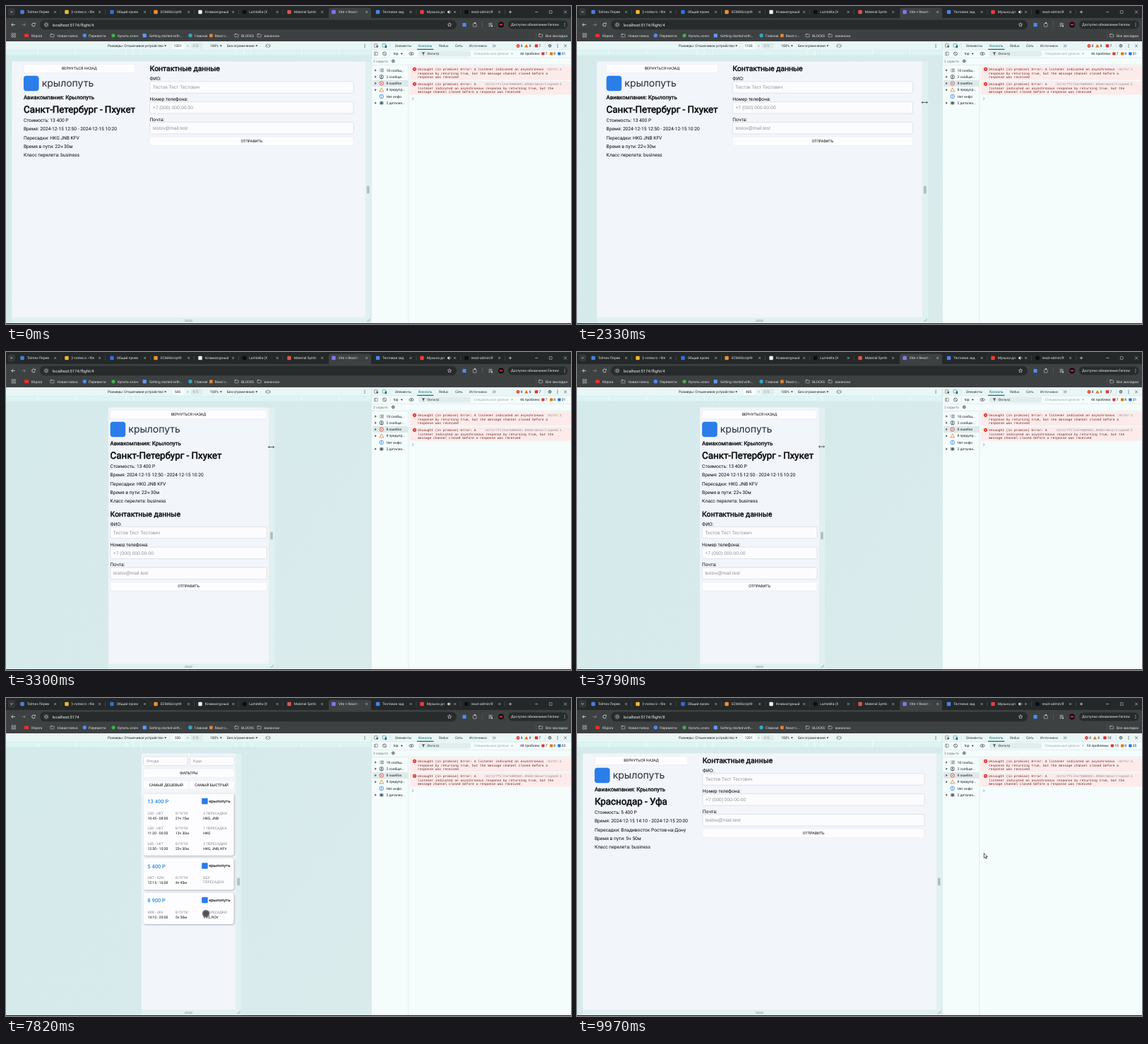
An HTML page with a canvas that plays this animation: 800x450 px, repeating every 10 s.

```html
<!DOCTYPE html>
<html lang="ru">
<head>
<meta charset="utf-8">
<title>Flight page</title>
<style>
html, body { margin: 0; width: 100%; height: 100%; overflow: hidden; background: #000; }
canvas { display: block; width: 800px; height: 450px; }
</style>
</head>
<body>
<canvas id="stage"></canvas>
<script>
const LOOP = 10000, CSS = 1 / 2.4, MID = 258.5;
const TO_LIST = 5480, TO_SECOND = 8200;
const UI = 'Roboto, "Noto Sans", sans-serif';
const ARIAL = '"Liberation Sans", Arial, sans-serif';
const MONO = '"Liberation Mono", monospace';
const LOGO = 'Inter, Roboto, sans-serif';
const INK = '#1f2326', BLACK = '#08090b', LIGHT = '#e3e3e3', BRAND = '#2b7de9';
const STRIP = '#242829', BAR = '#3d4142', WELL = '#272b2b';

const canvas = document.getElementById('stage');
const c = canvas.getContext('2d');
const dpr = window.devicePixelRatio || 1;
canvas.width = 800 * dpr;
canvas.height = 450 * dpr;

// ---------- drawing helpers ----------
function setFont(size, font = UI, weight = 400) {
  c.font = `${weight} ${size}px ${font}`;
}
// y is the middle of the capital letters
function text(s, x, y, o = {}) {
  const { size = 4.88, color = INK, font = UI, weight = 400, align = 'left', heavy = false } = o;
  setFont(size, font, weight);
  c.fillStyle = color;
  c.textAlign = align;
  c.fillText(s, x, y + size * 0.355);
  if (heavy) {
    c.strokeStyle = color;
    c.lineWidth = size / 24;
    c.strokeText(s, x, y + size * 0.355);
  }
}
function box(x, y, w, h, fill, r = 0, stroke) {
  c.beginPath();
  c.roundRect(x, y, w, h, r);
  if (fill) { c.fillStyle = fill; c.fill(); }
  if (stroke) { c.strokeStyle = stroke; c.lineWidth = 0.5; c.stroke(); }
}
function dot(x, y, r, color) {
  c.beginPath();
  c.arc(x, y, r, 0, 7);
  c.fillStyle = color;
  c.fill();
}
function ring(x, y, r, color, w = 0.7, from = 0, to = 6.3) {
  c.beginPath();
  c.arc(x, y, r, from, to);
  c.strokeStyle = color;
  c.lineWidth = w;
  c.stroke();
}
function line(color, w, ...p) {
  c.beginPath();
  for (let i = 0; i < p.length; i += 2) c.lineTo(p[i], p[i + 1]);
  c.strokeStyle = color;
  c.lineWidth = w;
  c.stroke();
}
function poly(color, ...p) {
  c.beginPath();
  for (let i = 0; i < p.length; i += 2) c.lineTo(p[i], p[i + 1]);
  c.closePath();
  c.fillStyle = color;
  c.fill();
}
const cross = (x, y, r, color, w = 0.6) => {
  line(color, w, x - r, y - r, x + r, y + r);
  line(color, w, x - r, y + r, x + r, y - r);
};
const down = (x, y, color = INK) => poly(color, x - 1.5, y - 0.9, x + 1.5, y - 0.9, x, y + 1.1);
const right = (x, y) => poly('#4a5055', x - 1, y - 1.7, x + 1.4, y, x - 1, y + 1.7);
const warn = (x, y) => poly('#e8710a', x, y - 2.4, x + 2.6, y + 2.2, x - 2.6, y + 2.2);
const kebab = (x, y, color) => [-2, 0, 2].forEach(d => dot(x, y + d, 0.55, color));
function gear(x, y, color = '#40484c') {
  ring(x, y, 1.9, color, 0.9);
  dot(x, y, 0.8, color);
}
function folder(x, y) {
  box(x - 2.6, y - 1.6, 5.2, 3.8, null, 0.6, LIGHT);
  line(LIGHT, 0.7, x - 2.4, y - 2, x - 0.4, y - 2);
}

// ---------- timing ----------
function at(keys, t, col = 1, ease = false) {
  if (t <= keys[0][0]) return keys[0][col];
  for (let i = 1; i < keys.length; i++) {
    const a = keys[i - 1], b = keys[i];
    if (t <= b[0]) {
      let k = (t - a[0]) / (b[0] - a[0]);
      if (ease) k = k * k * (3 - 2 * k);
      return a[col] + (b[col] - a[col]) * k;
    }
  }
  return keys[keys.length - 1][col];
}
const WIDTH = [[2180, 1201], [2520, 985], [2820, 781], [3300, 545], [3790, 405], [4350, 320],
  [8620, 320], [8950, 790], [9350, 1201]];
const PAD = [[320, 10], [405, 7], [781, 5], [1201, 40]];
const COME = [[1700, 560, 456], [2150, 512.7, 137]];
const ROAM = [[4450, 329, 134], [4750, 330, 105], [5270, 288, 75.5], [5430, 262, 90], [6330, 262, 90],
  [6800, 264, 101], [7150, 264, 101], [7800, 283, 305], [8250, 283, 305], [8600, 329, 262]];
const LEAVE = [[9350, 512.7, 240], [9900, 576.3, 219.6]];

// ---------- browser frame ----------
const TABS = [
  [23, 'Tolmex Перев', '#4a7fe0'], [86, '[~notes/s ~file', '#f2b92d'], [150, 'Общий проек', '#2f6fe0'],
  [212, 'ECMAScript®', '#f0902c'], [275, 'Клавиатурный', '#f0f0f0'], [337.5, 'Lumirella (X', '#0e0e0e'],
  [401, 'Material Symb', '#e0574a'], [464, 'Vite + React -', '#8d72f2'], [526.5, 'Тестовое зад', '#4285f4'],
  [589, 'Музыка дл', '#f23a3a'], [652, 'react-admin/R', '#0e0e0e']
];
function browser(url) {
  box(0, 0, 800, 17, STRIP);
  box(0, 17, 800, 33, BAR);
  box(3, 3, 10, 10.5, '#333738', 3);
  line(LIGHT, 0.8, 6.3, 7.5, 8, 9.2, 9.7, 7.5);
  box(457, 2.5, 60, 16, BAR, 3.5);
  TABS.forEach(([x, title, color], i) => {
    box(x - 2.7, 5.8, 5.4, 5.4, color, 1);
    text(title, x + 6.7, 8.6, { color: LIGHT });
    cross(x + 46.6, 8.5, 1.5, '#d0d0d0');
    if (i !== 6 && i !== 7) line('#555', 0.5, x + 54.5, 5, x + 54.5, 12);
  });
  poly(LIGHT, 625, 7.6, 626.3, 7.6, 628, 6, 628, 11, 626.3, 9.6, 625, 9.6);
  ring(628, 8.5, 1.8, LIGHT, 0.6, -1, 1);
  line(LIGHT, 0.7, 711.8, 8.5, 716.2, 8.5);
  line(LIGHT, 0.7, 714, 6.3, 714, 10.7);
  line(LIGHT, 0.6, 749.2, 8.5, 753.2, 8.5);
  box(769.3, 6.6, 3.8, 3.8, null, 0.5, LIGHT);
  cross(792, 8.5, 2, LIGHT);

  line(LIGHT, 0.8, 12.8, 26.5, 7.8, 26.5);
  line(LIGHT, 0.8, 10, 24.2, 7.7, 26.5, 10, 28.8);
  line('#878787', 0.8, 22.5, 26.5, 27.5, 26.5);
  line('#878787', 0.8, 25.3, 24.2, 27.6, 26.5, 25.3, 28.8);
  ring(39, 26.5, 2.3, LIGHT, 0.8, 0.2, 5.4);
  poly(LIGHT, 39.8, 25.6, 41.7, 23.6, 41.7, 25.8);
  box(48, 19.7, 590, 13.6, WELL, 6.8);
  dot(57, 26.5, 4.3, BAR);
  ring(57, 26.5, 1.9, LIGHT, 0.6);
  text(url, 65.7, 26.6, { size: 5.75, color: '#f0f0f0' });
  c.beginPath();
  for (let i = 0; i < 10; i++) {
    const a = i * Math.PI / 5 - Math.PI / 2, r = i % 2 ? 1.3 : 2.9;
    c.lineTo(628 + r * Math.cos(a), 26.5 + r * Math.sin(a));
  }
  c.closePath();
  c.strokeStyle = LIGHT;
  c.lineWidth = 0.6;
  c.stroke();
  box(646.4, 24, 5.2, 5.2, '#4d8df5', 0.8);
  box(661.3, 24.6, 4.8, 4.6, null, 0.6, LIGHT);
  dot(664, 24.1, 1, LIGHT);
  line('#646464', 0.5, 674.5, 22, 674.5, 31);
  [24.6, 26.6, 28.6].forEach((y, i) => line(LIGHT, 0.7, 683.5, y, i < 2 ? 688.5 : 686, y));
  dot(688, 28.5, 1.1, LIGHT);
  dot(701, 26.5, 4, '#0e0e0e');
  box(698.6, 25.2, 4.8, 2.4, '#d62839', 0.6);
  box(711, 20.4, 84.5, 12.2, WELL, 6);
  text('Доступно обновление Fenrow', 715, 26.5, { color: '#f0f0f0' });
  kebab(791, 26.5, LIGHT);

  [9, 12.4].forEach(x => [39.7, 43].forEach(y => box(x - 1, y - 1, 2.2, 2.2, null, 0.2, LIGHT)));
  box(26, 39.5, 6, 4.6, '#ff2b2b', 1.2);
  dot(111.3, 41.8, 2.7, '#4d8df5');
  dot(152, 41.8, 2.6, '#43b04a');
  box(193.6, 39.2, 5.2, 5.2, '#5f9cf2', 0.8);
  dot(261, 41.8, 2.7, '#35a7c4');
  box(288, 39.4, 4.6, 4.8, '#e0873a', 0.8);
  [65.5, 326.5, 358.5, 757].forEach(x => folder(x, 41.6));
  [[36, 'Klipora'], [72.5, 'Новая папка'], [117, 'Перевести'], [158, 'Купить ключ'],
    [203, 'Getting started with...'], [267, 'Главная'], [295.5, 'React с...'], [333, 'BLOCKS'],
    [365.5, 'вакански'], [764, 'Все закладки']].forEach(([x, s]) => text(s, x, 41.8, { color: LIGHT }));
  line('#5a5e5f', 0.5, 750.5, 38, 750.5, 46);
}

// ---------- inspector panel ----------
function inspector(v) {
  box(517, 50, 283, 400, '#f4fcfc');
  box(517, 50, 283, 12, '#e9f6f6');
  line('#c3d5d6', 0.5, 517.3, 50, 517.3, 449);
  [62, 73.3].forEach(y => line('#cfdfe0', 0.5, 517, y, 800, y));
  box(521.5, 53.7, 4.6, 4.6, null, 0.5, '#40484c');
  poly('#40484c', 523.7, 55.6, 527.4, 57, 525.5, 59);
  box(533, 53.7, 5, 4.4, null, 0.5, '#00757c');
  box(536.6, 55.6, 2.4, 3.6, '#00757c', 0.4);
  line('#c3d5d6', 0.5, 544, 52.5, 544, 60);
  [[550.5, 'Элементы'], [584, 'Консоль'], [613, 'Redux'], [636, 'Сеть'], [656, 'Источники']]
    .forEach(([x, s]) => text(s, x, 56.5, { color: x === 584 ? '#00696f' : '#30383b' }));
  box(582, 60.8, 23.5, 1.2, '#00757c', 0.5);
  [689, 691.4].forEach(x => line('#40484c', 0.7, x, 54.6, x + 1.9, 56.4, x, 58.2));
  const sh = v.bad > 9 ? -3.5 : 0;
  dot(725 + sh, 56.5, 2.4, '#dc362e');
  cross(725 + sh, 56.5, 0.9, '#fff');
  text('8', 728.7 + sh, 56.5);
  warn(736.8 + sh, 56.4);
  text('8', 740.7 + sh, 56.5);
  box(748.7 + sh, 54.2, 4.5, 4.2, '#dc362e', 0.8);
  text(v.bad, 754.6 + sh, 56.5);
  line('#c3d5d6', 0.5, 763.5, 52.5, 763.5, 60);
  gear(770, 56.3);
  kebab(781, 56.4, '#40484c');
  cross(792, 56.4, 1.8, '#40484c', 0.7);

  box(521.5, 65.2, 4.8, 4.6, null, 0.5, '#40484c');
  line('#40484c', 0.6, 523.2, 65.2, 523.2, 69.8);
  ring(536, 67.5, 2.5, '#40484c');
  line('#40484c', 0.7, 534.3, 65.8, 537.7, 69.2);
  line('#c3d5d6', 0.5, 544, 64, 544, 71);
  text('top', 548.5, 67.6);
  down(560.3, 67.6);
  c.beginPath();
  c.ellipse(574, 67.5, 3.2, 2, 0, 0, 7);
  c.strokeStyle = '#40484c';
  c.lineWidth = 0.7;
  c.stroke();
  dot(574, 67.5, 1, '#40484c');
  box(584, 63.6, 74, 8, '#e0eded', 2);
  poly('#40484c', 588.8, 65.6, 593.2, 65.6, 591.5, 67.7, 591.5, 69.6, 590.5, 69.6, 590.5, 67.7);
  text('Фильтр', 596.3, 67.6, { color: '#40484c' });
  text('Специальные уровни', 662.5, 67.6, { color: '#a3acae' });
  down(716.5, 67.6, '#a3acae');
  const ps = v.bad > 9 ? -2.5 : 0;
  text(v.issues, 756 + ps, 67.6, { align: 'right' });
  box(758.3 + ps, 65.5, 4.2, 4, '#dc362e', 0.8);
  text(v.bad, 763.8 + ps, 67.6);
  box(770, 65.5, 4.2, 4, '#e8710a', 0.8);
  text('8', 775.3, 67.6);
  box(781.3, 65.5, 4.2, 4, '#1a73e8', 0.8);
  text(v.info, 786.8, 67.6);
  text('2 скрыто', 520, 78.2, { color: '#6b7477' });
  gear(548.3, 77.9);

  line('#cfdfe0', 0.5, 517, 83.5, 800, 83.5);
  line('#cfdfe0', 0.5, 569.7, 83.5, 569.7, 449);
  box(519, 105, 50.4, 9, '#dfe9ea');
  [[91, '18 сообщ...'], [100.2, '2 сообще...'], [109.5, '8 ошибок'], [118.7, '8 предупр...'],
    [128, 'Нет инфо'], [137.2, '2 детализ...']].forEach(([y, s], i) => {
    if (i !== 4) right(523.3, y);
    text(s, 538.5, y);
  });
  [-1.8, 0, 1.8].forEach(d => {
    line('#40484c', 0.7, 530.2, 91 + d, 534.8, 91 + d);
    dot(528.9, 91 + d, 0.4, '#40484c');
  });
  ring(531.7, 100.2, 2.8, '#40484c');
  dot(531.7, 99.4, 1, '#40484c');
  line('#40484c', 1, 530, 102, 533.4, 102);
  ring(531.7, 109.5, 2.8, '#dc362e');
  cross(531.7, 109.5, 1.1, '#dc362e');
  c.beginPath();
  [[531.7, 115.8], [534.6, 121], [528.8, 121]].forEach(p => c.lineTo(...p));
  c.closePath();
  c.strokeStyle = '#e8710a';
  c.lineWidth = 0.7;
  c.stroke();
  ring(531.7, 128, 2.8, '#1a73e8');
  line('#1a73e8', 0.8, 531.7, 127.4, 531.7, 129.6);
  dot(531.7, 126.4, 0.5, '#1a73e8');
  dot(531.7, 137.3, 1.6, '#555d60');
  ring(531.7, 137.3, 2.1, '#555d60', 0.5);
  [-1.5, 0, 1.5].forEach(d => line('#555d60', 0.5, 528.7, 137.3 + d, 534.7, 137.3 + d));

  const log = (y, lines, link) => {
    box(571.5, y - 4.6, 228.5, 19.6, '#fcebea', 1.5);
    dot(578.5, y - 0.3, 2.6, '#dc362e');
    cross(578.5, y - 0.3, 0.9, '#fff');
    const o = { size: 4.58, font: MONO, color: '#6a1a17' };
    lines.forEach((s, i) => text(s, 583, y + i * 5.6, o));
    text(link, 787, y, { ...o, color: '#8d8585', align: 'right' });
  };
  log(89.6, ['Uncaught (in promise) Error: A listener indicated an asynchronous',
    'response by returning true, but the message channel closed before a',
    'response was received'], ':5174/:1');
  log(110.6, ['Uncaught (in promise) Error: A',
    'listener indicated an asynchronous response by returning true, but the',
    'message channel closed before a response was received'],
  ':5174/?filter%5B%5D=…8%5D=3&sort=speed:1');
  line('#3a78d8', 0.7, 575.2, 129.4, 576.9, 131.1, 575.2, 132.8);
}

// ---------- device view ----------
function device(w, pl, pr) {
  const g = c.createLinearGradient(0, 70, 517, 449);
  g.addColorStop(0, '#d5eaeb');
  g.addColorStop(1, '#daebec');
  c.fillStyle = g;
  c.fillRect(0, 50, 517, 400);
  box(0, 50, 517, 12, '#e9f6f6');
  box(0, 62.4, 517, 7.2, '#dcf4f4');
  [320, 375, 425, 768, 1024].forEach(b => [-1, 1].forEach(s => {
    const x = MID + s * b * CSS / 2;
    line('#f4fcfc', 0.9, x, 62.4, x, 69.6);
  }));
  text('Размеры: Отзывчивое устройство', 144, 56.5);
  down(225.6, 56.5);
  box(235.5, 52.3, 17, 8.2, '#f7fdfd', 1.4);
  text(Math.round(w), 243, 56.5, { align: 'center' });
  text('×', 257.2, 56.5, { align: 'center', color: '#788083' });
  box(261.5, 52.3, 17, 8.2, '#dfecec', 1.4);
  text('870', 268.5, 56.5, { align: 'center', color: '#98a1a3' });
  text('100%', 289, 56.5);
  down(304.3, 56.5);
  text('Без ограничения', 313, 56.5);
  down(354.8, 56.5);
  c.save();
  c.translate(371, 56.3);
  c.rotate(-Math.PI / 4);
  box(-1.4, -2.4, 2.8, 4.8, null, 0.5, '#30383b');
  c.restore();
  ring(371, 56.3, 3.1, '#30383b', 0.5, -0.9, 0.5);
  ring(371, 56.3, 3.1, '#30383b', 0.5, 2.2, 3.7);
  kebab(508, 56.4, '#40484c');

  box(pl, 78.5, pr - pl + 8.3, 370.5, '#e1f0f1');
  box(pl, 78.5, pr - pl, 362.5, '#f2f5fa');
  box(pr + 2, 254.5, 4, 11, '#c2cfd1', 0.6);
  [3.2, 4.8].forEach(d => line('#87979a', 0.5, pr + d, 255.5, pr + d, 264.5));
  [444.6, 446.3].forEach(y => line('#87979a', 0.6, 253, y, 264, y));
  [[2, 7], [4, 7]].forEach(([a, b]) => line('#87979a', 0.6, pr + a, 440.2 + b, pr + b, 440.2 + a));
}

const button = (s, x, y, w) => {
  box(x, y - 6.2, w, 12.4, '#fdfdff', 2.5, '#e2e6ec');
  text(s, x + w / 2, y, { size: 5.33, align: 'center', color: BLACK });
};
function input(s, x, y, w, h, size, font) {
  box(x, y - h / 2, w, h, '#fcfcfe', 1.8, '#c6ccd4');
  text(s, x + 4.2, y, { size, font, color: '#8f9399' });
}
function wrap(s, width) {
  const rows = [];
  let row = '';
  for (const word of s.split(' ')) {
    const next = row ? row + ' ' + word : word;
    if (row && c.measureText(next).width > width) { rows.push(row); row = word; }
    else row = next;
  }
  return rows.concat(row);
}

const FLIGHTS = {
  4: ['Санкт-Петербург - Пхукет', 'Стоимость: 13 400 Р', 'Время: 2024-12-15 12:50 - 2024-12-15 10:20',
    'Пересадки: HKG JNB KFV', 'Время в пути: 22ч 30м', 'Класс перелета: business'],
  8: ['Краснодар - Уфа', 'Стоимость: 5 400 Р', 'Время: 2024-12-15 14:10 - 2024-12-15 20:00',
    'Пересадки: Владивосток Ростов-на-Дону', 'Время в пути: 5ч 50м', 'Класс перелета: business']
};
function details(id, w, pl, pr) {
  const [title, ...rows] = FLIGHTS[id];
  const pad = at(PAD, w) * CSS, x = pl + pad, full = pr - pad - x, wide = w >= 768;
  const H1 = 13.33, P = 6.67;
  const heading = (s, hx, hy, size) => text(s, hx, hy, { size, heavy: true, color: BLACK });
  setFont(H1);
  let col = c.measureText(title).width;
  setFont(P);
  rows.forEach(s => { col = Math.max(col, c.measureText(s).width); });
  if (!wide) col = full;

  button('ВЕРНУТЬСЯ НАЗАД', x, 88.6, col);
  box(x, 98.7, 21.6, 21.6, BRAND, 4);
  text('крылопуть', x + 25.7, 108.8, { size: 14, font: LOGO, color: '#262b35' });
  heading('Авиакомпания: Крылопуть', x, 129.2, 7.9);
  let y = 146;
  setFont(H1);
  wrap(title, col + 1).forEach((s, i) => {
    y = 146 + i * 16;
    heading(s, x, y, H1);
  });
  y += 3.9;
  rows.forEach(s => {
    y += 12.1;
    setFont(P);
    wrap(s, col + 1).forEach((part, i) => {
      if (i) y += 8;
      text(part, x, y, { size: P, color: BLACK });
    });
  });

  const fx = wide ? x + col + 20.8 : x, fw = wide ? pr - pad - fx : full;
  const fy = wide ? 88.7 : y + 18.7;
  heading('Контактные данные', fx, fy, 10.4);
  [['ФИО:', 'Тестов Тест Тестович'], ['Номер телефона:', '+7 (000) 000-00-00'],
    ['Почта:', 'testov@mail.test']].forEach(([label, hint], i) => {
    const ly = fy + 14.3 + i * 28.8;
    text(label, fx, ly, { size: P, color: BLACK });
    input(hint, fx, ly + 12.1, fw, 16.4, P, ARIAL);
  });
  button('ОТПРАВИТЬ', fx, fy + 102.5, fw);
}

const CARDS = [
  [135.5, 87.5, '13 400 Р', [
    ['LED - HKT', '10:45 - 08:00', '21ч 15м', ['3 ПЕРЕСАДКИ'], 'HKG, JNB'],
    ['LED - HKT', '11:20 - 00:50', '13ч 30м', ['1 ПЕРЕСАДКА'], 'HKG'],
    ['LED - HKT', '12:50 - 10:20', '22ч 30м', ['3 ПЕРЕСАДКИ'], 'HKG, JNB, KFV']]],
  [227, 44.4, '5 400 Р', [['HKT - KZN', '12:15 - 16:00', '4ч 45м', ['БЕЗ', 'ПЕРЕСАДОК'], '']]],
  [275.5, 44.4, '8 900 Р', [['KRR - UFA', '14:10 - 20:00', '5ч 50м', ['2 ПЕРЕСАДКИ'], 'VVO, ROV']]]
];
function list(pl, pr) {
  const x = pl + 2.7, r = pr - 2, w = r - x;
  input('Откуда', x, 89.3, 62.5, 12.8, 5.4, UI);
  input('Куда', r - 62.5, 89.3, 62.5, 12.8, 5.4, UI);
  button('ФИЛЬТРЫ', x, 106.2, w);
  button('САМЫЙ ДЕШЕВЫЙ', x, 123, w / 2);
  button('САМЫЙ БЫСТРЫЙ', x + w / 2, 123, w / 2);
  CARDS.forEach(([y, h, price, rows]) => {
    c.save();
    c.shadowColor = 'rgba(30,40,60,.4)';
    c.shadowBlur = 2.5 * dpr;
    c.shadowOffsetY = c.shadowOffsetX = 0.8 * dpr;
    box(x, y, w - 0.5, h, '#fdfdff', 3);
    c.restore();
    text(price, x + 5.8, y + 10.9, { size: 7.5, weight: 500, color: '#2f8ae6' });
    box(x + 82.6, y + 6.2, 8.6, 8.6, BRAND, 1.2);
    text('крылопуть', x + 92.6, y + 10.3, { size: 5.6, font: LOGO, weight: 600, color: '#14171c' });
    rows.forEach(([route, time, span, stops, via], i) => {
      const ry = y + 27.7 + i * 21.4;
      const grey = { size: 5, color: '#868b93' }, dark = { size: 5, color: BLACK };
      text(route, x + 6, ry, grey);
      text('В ПУТИ', x + 45.4, ry, grey);
      stops.forEach((s, k) => text(s, x + 84.8, ry + k * 6, grey));
      text(time, x + 6, ry + 7, dark);
      text(span, x + 45.4, ry + 7, dark);
      text(via, x + 84.8, ry + 7, dark);
    });
  });
}

// ---------- pointer ----------
function arrow(x, y) {
  const pts = [0, 0, 0, 6.8, 1.6, 5.4, 2.7, 7.8, 3.8, 7.3, 2.8, 5, 4.9, 4.9];
  c.beginPath();
  for (let i = 0; i < pts.length; i += 2) c.lineTo(x + pts[i], y + pts[i + 1]);
  c.closePath();
  c.fillStyle = '#fff';
  c.fill();
  c.strokeStyle = '#111';
  c.lineWidth = 0.7;
  c.stroke();
}
function resizer(x, y) {
  [['#fff', 1.8], ['#111', 0.7]].forEach(([color, w]) => {
    line(color, w, x - 4, y, x + 4, y);
    [-1, 1].forEach(s => line(color, w, x + s * 2.4, y - 1.7, x + s * 4.1, y, x + s * 2.4, y + 1.7));
  });
}
function pointer(t, pl, pr) {
  if (t < COME[0][0]) return;
  const first = t >= 2150 && t < 4450, second = t >= 8600 && t < 9350;
  if (first || second) {
    const y = first ? at([[2150, 137], [2820, 135], [3790, 134]], t) : at([[8600, 262], [9350, 240]], t);
    resizer(pr + 3.5, y);
    return;
  }
  const path = t < 2150 ? COME : t < 8600 ? ROAM : LEAVE;
  const x = at(path, t, 1, true), y = at(path, t, 2, true);
  if (x > pl && x < pr && y > 78.5 && y < 441) {
    dot(x, y, 5.2, 'rgba(70,70,74,.75)');
    dot(x, y, 3.6, 'rgba(50,50,54,.5)');
  } else {
    arrow(x, y);
  }
}

const VIEWS = [
  { id: 4, url: '/flight/4', issues: '46 проблем:', bad: 7, info: 31 },
  { id: 0, url: '', issues: '48 проблем:', bad: 7, info: 33 },
  { id: 8, url: '/flight/8', issues: '53 проблемы:', bad: 10, info: 35 }
];
function draw(t) {
  const view = VIEWS[t < TO_LIST ? 0 : t < TO_SECOND ? 1 : 2];
  const w = at(WIDTH, t), half = w * CSS / 2, pl = MID - half, pr = MID + half;
  c.setTransform(dpr, 0, 0, dpr, 0, 0);
  c.textBaseline = 'alphabetic';
  c.textRendering = 'geometricPrecision';
  c.lineJoin = 'round';
  device(w, pl, pr);
  if (view.id) details(view.id, w, pl, pr);
  else list(pl, pr);
  inspector(view);
  browser('localhost:5174' + view.url);
  box(0, 449, 800, 1, '#101414');
  pointer(t, pl, pr);
}

const start = performance.now();
function frame() {
  draw((performance.now() - start) % LOOP);
  requestAnimationFrame(frame);
}
frame();
</script>
</body>
</html>
```
